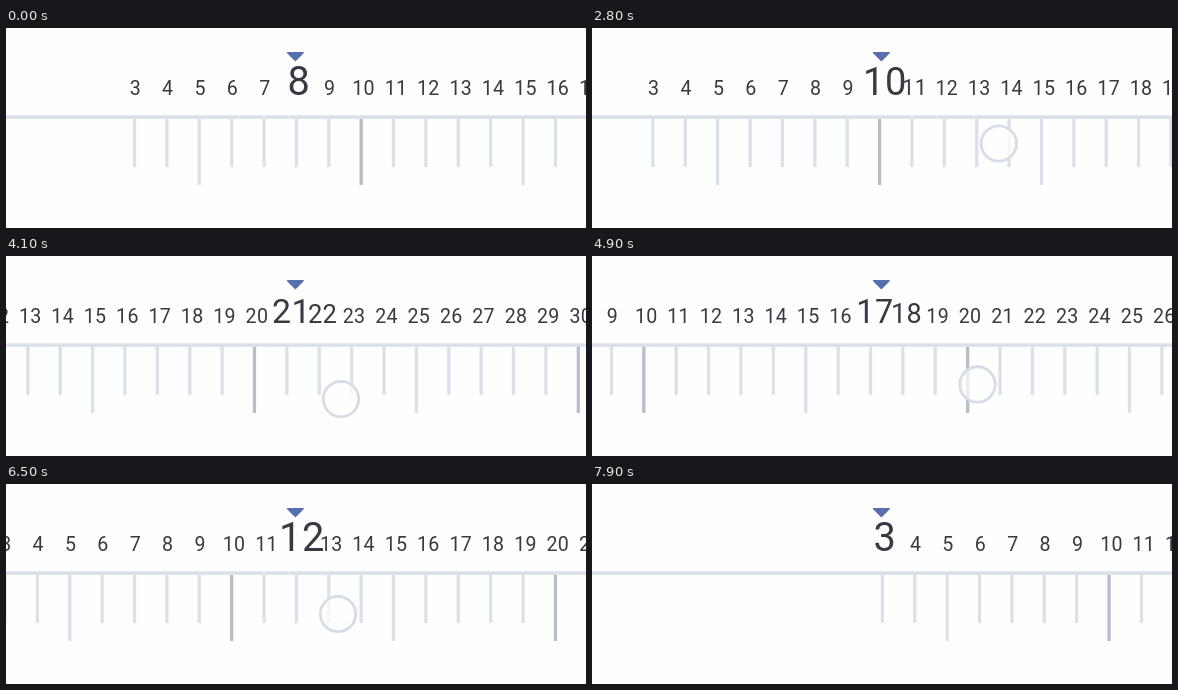
Write an HTML page that moves like this. It is 580 px wide and 200 px high and loops after 8000 ms.

```html
<!DOCTYPE html>
<html lang="en">
<head>
<meta charset="utf-8">
<title>Ruler picker</title>
<style>
html, body { margin: 0; width: 100%; height: 100%; overflow: hidden; background: #fefefe; }
svg { display: block; width: 580px; height: 200px; }
text { font-family: Roboto, "Open Sans", sans-serif; text-anchor: middle; letter-spacing: .015em; fill: #383a43; }
</style>
</head>
<body>
<svg viewBox="0 0 580 200">
  <rect width="580" height="200" fill="#fefefe"/>
  <g id="ticks" stroke-width="3.3"></g>
  <rect y="87.3" width="580" height="3.6" fill="#dbe1e9"/>
  <g id="labels"></g>
  <path d="M281.6 24.8H297.2L289.4 32.6Z" fill="#566fae" stroke="#566fae" stroke-width="1.4" stroke-linejoin="round"/>
  <circle id="touch" r="17.7" fill="#fff" fill-opacity=".7" stroke="#d6dde7" stroke-width="2.8"/>
</svg>
<script>
const LOOP = 8000, STEP = 100, GAP = 32.38, CENTER = 290.4;
const MIN = 3, MAX = 40, FIRST = 8;
const DRAG = .935; // finger travel per ruler travel
const NS = "http://www.w3.org/2000/svg";
const $ = id => document.getElementById(id);

// Each swipe turns the ruler by some units while a finger slides down the stage.
const swipes = [
  { start: 2550, time: 800, by: 9, x: 470, y: 93, drop: 97 },
  { start: 3400, time: 1080, by: 6, x: 465, y: 93, drop: 70 },
  { start: 4480, time: 1050, by: -16, x: 215, y: 95, drop: 95 },
  { start: 6050, time: 450, by: 5, x: 470, y: 93, drop: 70 },
  { start: 6500, time: 900, by: -9, x: 332, y: 130, drop: 70 }
];

const clamp = v => Math.min(1, Math.max(0, v));
const ease = u => u * u * (3 - 2 * u);
const progress = (s, t) => ease(clamp((t - s.start) / s.time));

function set(el, attrs) {
  for (const k in attrs) el.setAttribute(k, attrs[k]);
}

function add(parent, tag, attrs) {
  const el = document.createElementNS(NS, tag);
  set(el, attrs);
  return parent.appendChild(el);
}

const labels = [];
for (let n = MIN; n <= MAX; n++) {
  const x = (n - MIN) * GAP;
  add($("ticks"), "line", {
    x1: x, x2: x, y1: 90.5, y2: n % 5 ? 139 : 157,
    stroke: n % 10 ? "#dbe1e9" : "#b5bfcc"
  });
  const label = add($("labels"), "text", { y: 66.9 });
  label.textContent = n;
  labels.push(label);
}

function drawRuler(value) {
  const start = CENTER - (value - MIN) * GAP;
  set($("ticks"), { transform: `translate(${start})` });
  labels.forEach((label, i) => {
    const n = i + MIN;
    const size = 19.6 + 20.2 * clamp(1 - Math.abs(n - value));
    const shift = String(n).length * size * .08 - .7;
    set(label, { x: start + i * GAP + shift, "font-size": size });
  });
}

function drawTouch(t) {
  const s = swipes.find(s => t < s.start + s.time);
  if (!s) return set($("touch"), { opacity: 0 });
  const p = progress(s, t);
  const y = s.y + s.drop * p;
  const appear = (t - s.start) / 100 + 1;
  const leave = (s.start + s.time - t) / 200;
  const sink = (190 - y) / 40;
  set($("touch"), {
    cx: s.x - s.by * p * GAP * DRAG,
    cy: y,
    opacity: clamp(Math.min(appear, leave, sink))
  });
}

function draw(t) {
  drawRuler(swipes.reduce((v, s) => v + s.by * progress(s, t), FIRST));
  drawTouch(t);
}

const begin = performance.now();
function frame() {
  const t = (performance.now() - begin) % LOOP;
  draw(Math.floor(t / STEP) * STEP);
  requestAnimationFrame(frame);
}
frame();
</script>
</body>
</html>
```
